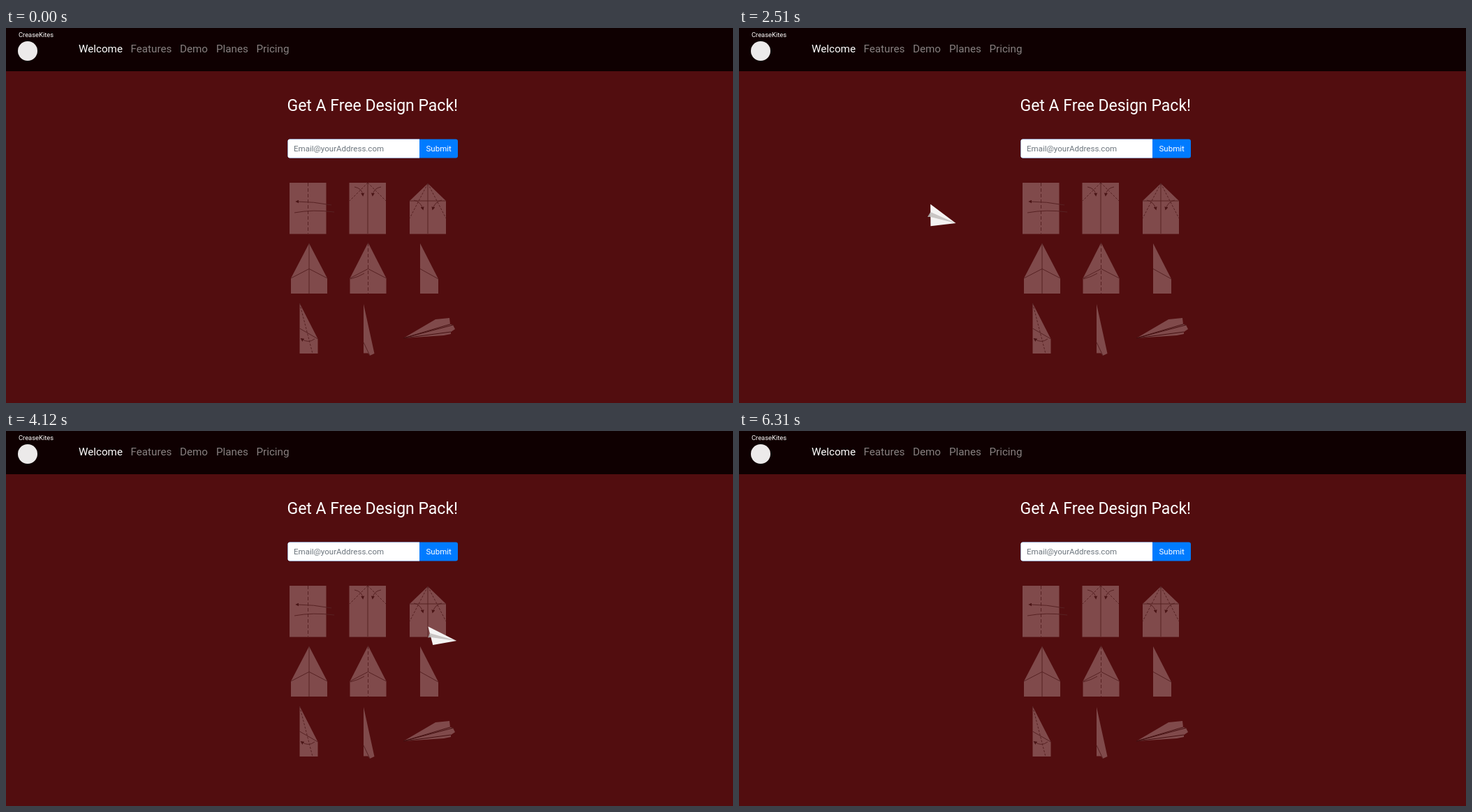
An HTML page for the animation above (6.92 s loop, 1041 by 538 pixels).

```html
<!DOCTYPE html>
<html lang="en">
<head>
<meta charset="utf-8">
<title>Free Design Pack</title>
<style>
  html, body { margin: 0; width: 100%; height: 100%; overflow: hidden; background: #520d0f; }
  svg { display: block; font-family: Roboto, sans-serif; }
  .nav { font-size: 15.2px; fill: #878080; }
  .form { font-size: 11.52px; }
  .paper { fill: #804a4b; }
  .fold { fill: none; stroke: #572223; stroke-width: 1; }
  .dash { stroke-dasharray: 3 2; }
  .long { stroke-dasharray: 5 3; }
  .arrow { marker-end: url(#tip); }
</style>
</head>
<body>
<svg width="1041" height="538" viewBox="0 0 1041 538">
  <defs>
    <marker id="tip" viewBox="0 0 6 6" refX="4" refY="3" markerWidth="5" markerHeight="5" orient="auto">
      <path d="M0 0L6 3L0 6Z" fill="#4a1516"/>
    </marker>
  </defs>

  <rect width="1041" height="62" fill="#0f0001"/>
  <circle cx="31" cy="33" r="14" fill="#eceaea"/>
  <text x="43" y="13" font-size="9.4" text-anchor="middle" fill="#fff">CreaseKites</text>
  <g class="nav">
    <text x="104" y="35" fill="#fff">Welcome</text>
    <text x="178.5" y="35">Features</text>
    <text x="249" y="35">Demo</text>
    <text x="301" y="35">Planes</text>
    <text x="358.5" y="35">Pricing</text>
  </g>

  <text x="402.5" y="119" font-size="23" fill="#fff">Get A Free Design Pack!</text>
  <g class="form">
    <rect x="403.5" y="159.5" width="243.5" height="27" rx="3" fill="#007bff"/>
    <path d="M592 159.5V186.5H406.5a3 3 0 0 1-3-3V162.500a3 3 0 0 1 3-3Z" fill="#fff"/>
    <text x="412" y="177" fill="#6c757d">Email@yourAddress.com</text>
    <text x="601.5" y="177" fill="#fff">Submit</text>
  </g>

  <g class="paper">
    <path d="M406 222H458.500V295.500H406Z"/>
    <path d="M491.500 222H544V295.500H491.500Z"/>
    <path d="M604 223L630 248V295.500H578V248Z"/>
    <path d="M434 309L460 359V381H408V359Z"/>
    <path d="M518.500 308L544.500 359V381H492.500V359Z"/>
    <path d="M593 309L619 360V381H593Z"/>
    <path d="M420.500 395L446.500 446V467H420.500Z"/>
    <path d="M512 396L527.500 467L521 470L518.500 466.500H512Z"/>
    <path d="M569 445L615 418L635 416L636 425L640 426L643 432L637 436V439L627 441Z"/>
  </g>
  <g class="fold">
    <path class="long" d="M432.500 222V295"/>
    <path class="arrow" d="M466 254Q440 249 416 249"/>
    <path d="M413 265Q440 260 470 264"/>

    <path d="M518 222V295"/>
    <path class="dash" d="M518 222L492 248M518 222L544 248"/>
    <path class="arrow" d="M499 228Q510 230 511 240"/>
    <path class="arrow" d="M537 228Q526 230 525 240"/>

    <path d="M604 223V295M578 248H630"/>
    <path class="dash" d="M604 223L578 273M604 223L630 273"/>
    <path class="arrow" d="M584 247Q594 249 597 260"/>
    <path class="arrow" d="M624 247Q614 249 611 260"/>

    <path d="M434 309V381M408 359L434 345.500L460 359"/>

    <path class="long" d="M518.500 308V381"/>
    <path d="M492.500 359L518.500 345.500L544.500 359M493 360Q505 357 513 352"/>

    <path d="M593 345.500L619 360"/>

    <path class="dash" d="M420.500 395L439 467"/>
    <path d="M420.500 431L446.500 446"/>
    <path class="arrow" d="M442 446Q433 453 423 446"/>

    <path d="M512 451L521 470"/>

    <path d="M569 445L636 425M569 445L640 426M569 445L637 436" stroke="#451011"/>
  </g>

  <g id="plane">
    <path id="tail" fill="#aaa4a3"/>
    <path id="wings" fill="#f5f3f3"/>
    <path id="crease" fill="#c9c5c4"/>
  </g>
</svg>
<script>
  const LOOP = 6920, TAKEOFF = 1060, GONE = 6310;
  const el = id => document.getElementById(id);
  const mix = (a, b, k) => a.map((v, i) => v + (b[i] - v) * k);
  const shape = (id, ...points) => el(id).setAttribute('d', 'M' + points.join('L') + 'Z');

  // The plane glides right while its wings tilt flat; s is flight progress.
  function draw(t) {
    const flying = t >= TAKEOFF && t < GONE;
    el('plane').style.display = flying ? '' : 'none';
    if (!flying) return;

    const s = (t - 1660) / 3700;
    const nose = [132 + 778 * s - 10 * s * s, 269 + 48 * s];
    const at = (x, y) => [nose[0] + x, nose[1] + y];
    const top = at(-34 - 10 * s, -31 + 16 * s);
    const bottom = at(-36 - 2 * s + 8 * s * s, 3 + 6 * s - 2 * s * s);
    const left = at(-39 - 8 * s + 8 * s * s, -12 + 14 * s - 4 * s * s);
    const upper = mix(top, bottom, 0.36), lower = mix(top, bottom, 0.58);

    shape('tail', left, upper, mix(upper, nose, 0.2), lower);
    shape('wings', top, nose, bottom);
    shape('crease', upper, nose, lower);
  }

  function tick() {
    draw(performance.now() % LOOP);
    requestAnimationFrame(tick);
  }
  tick();
</script>
</body>
</html>
```
